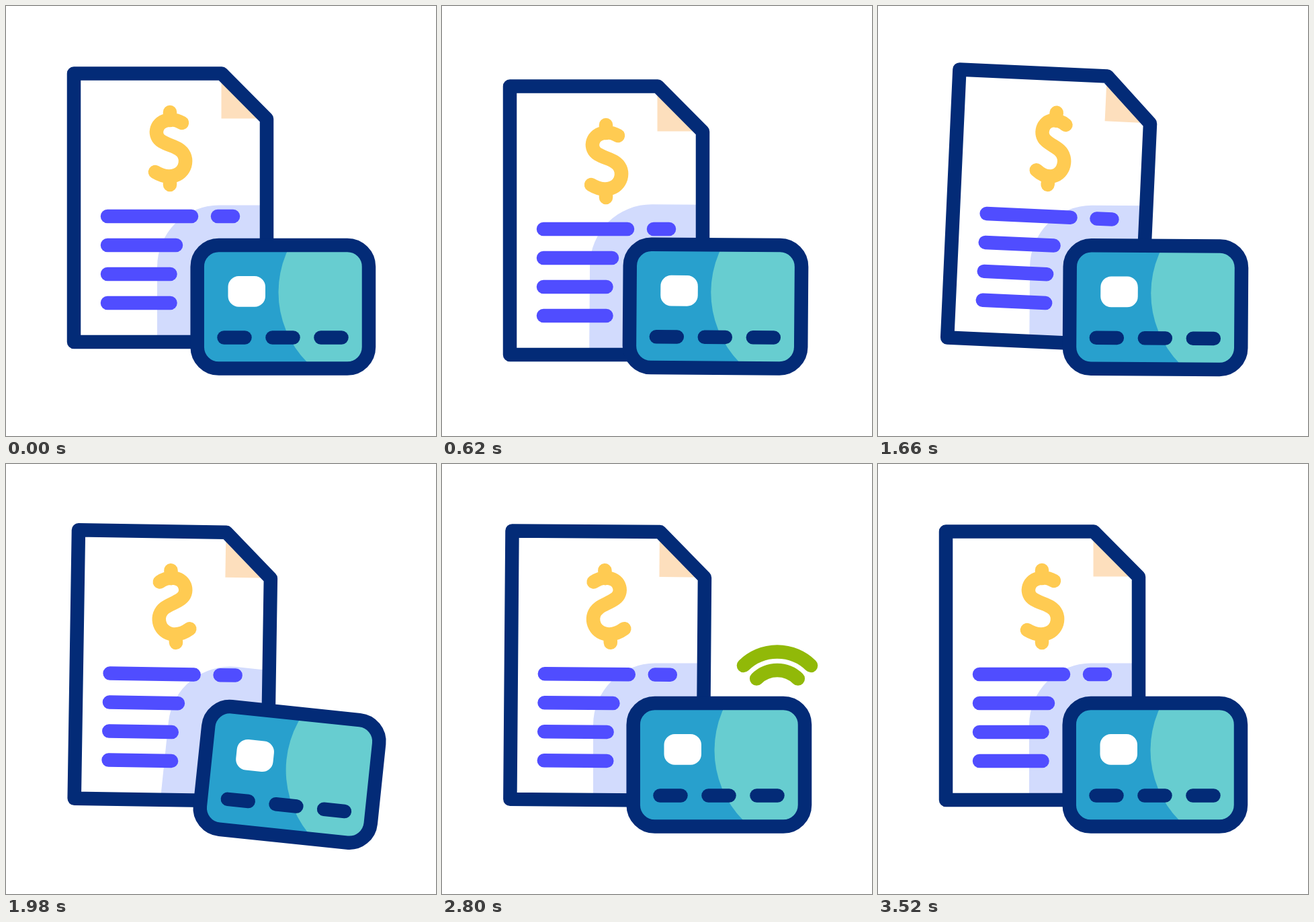
These frames come from a looping animation (640 px wide and 640 px high, 3600 ms). An HTML page with a canvas:

```html
<!DOCTYPE html>
<html lang="en">
<head>
<meta charset="utf-8">
<title>Invoice and card</title>
<style>
html, body { margin: 0; width: 100%; height: 100%; overflow: hidden; background: #fff; }
canvas { display: block; width: 100vmin; height: 100vmin; }
</style>
</head>
<body>
<canvas id="stage" width="640" height="640"></canvas>
<script>
const ctx = document.getElementById('stage').getContext('2d');
const LOOP = 3600;
const LINE = 20.5;
const NAVY = '#032b77', BLUE = '#28a0cd', TEAL = '#67cdd0', SHADE = '#d2dbfd';
const PEACH = '#fddfbd', GOLD = '#ffcb52', VIOLET = '#504dff', GREEN = '#91b908';

// Keys are [time, value] pairs, eased in and out between neighbours.
function track(keys, t) {
  if (t <= keys[0][0]) return keys[0][1];
  for (let i = 1; i < keys.length; i++) {
    const [t0, v0] = keys[i - 1], [t1, v1] = keys[i];
    if (t < t1) {
      const u = (t - t0) / (t1 - t0);
      return v0 + (v1 - v0) * u * u * (3 - 2 * u);
    }
  }
  return keys[keys.length - 1][1];
}

const docDrop = [[200, 0], [600, 19.2], [960, 0]];
const docTilt = [[1000, 0], [1400, -6], [1800, 6], [2200, -6], [2610, 6], [3010, -6], [3410, 0]];
const dollarFlip = [[1600, 1], [2000, -1], [2400, 1], [2800, -1], [3200, 1]];
const dollarTilt = [[1200, 0], [1600, 5], [3200, 5], [3520, 0]];
const cardSlide = [[0, 0], [240, 69.5], [960, -69.5], [1000, -69.5], [1400, 0]];
const cardRock = [[1600, 0], [2000, 6], [2400, -6], [2800, 0]];
const waves = [
  { radius: 44, keys: [[2100, 0], [2500, 1], [3240, 1], [3520, 0]] },
  { radius: 71.5, keys: [[2400, 0], [2800, 1], [3240, 1], [3520, 0]] },
  { radius: 99.5, keys: [[2800, 0], [3200, 1], [3240, 1], [3520, 0]] }
];

const sheet = new Path2D('M101 100.5H321L388 168V500H101Z');
const fold = new Path2D('M320.5 100V167.5H388Z');
const dollar = new Path2D(
  'M262 174C254 169.5 245 168.5 239 170.2C222 174 219 194 232 201.5' +
  'C240 206.5 250 208.5 257 213C273 223 269 246 252 252C242 255.5 231 252.5 222 247' +
  'M244 158V170M244 254V266');
const shade = new Path2D();
shade.roundRect(225, 296.5, 400, 320, 92);
const cardShape = new Path2D();
cardShape.roundRect(284.7, 356, 255.3, 183.5, 32);
const chip = new Path2D();
chip.roundRect(330.5, 402, 55.5, 45.7, 16);

function group(draw) {
  ctx.save();
  draw();
  ctx.restore();
}

function rotateAbout(x, y, degrees) {
  ctx.translate(x, y);
  ctx.rotate(degrees * Math.PI / 180);
  ctx.translate(-x, -y);
}

function scaleAbout(x, y, sx, sy) {
  ctx.translate(x, y);
  ctx.scale(sx, sy);
  ctx.translate(-x, -y);
}

function fill(path, color) {
  ctx.fillStyle = color;
  ctx.fill(path);
}

function stroke(path, color) {
  ctx.strokeStyle = color;
  ctx.stroke(path);
}

function bar(x0, x1, y, color) {
  const path = new Path2D();
  path.moveTo(x0, y);
  path.lineTo(x1, y);
  stroke(path, color);
}

function placeDoc(t) {
  ctx.translate(0, track(docDrop, t));
  rotateAbout(244.5, 544, track(docTilt, t));
}

// The card slides leaning on a rounded corner, then rocks on its left corner.
function placeCard(t) {
  const slide = track(cardSlide, t);
  ctx.translate(slide, 0);
  rotateAbout(slide > 0 ? 317 : 507.5, 507.5, -slide / 14);
  rotateAbout(276, 548, track(cardRock, t));
}

function drawDoc(t) {
  group(() => {
    placeDoc(t);
    fill(sheet, '#fff');
    fill(fold, PEACH);
  });
  group(() => {
    const frame = ctx.getTransform();
    placeDoc(t);
    ctx.clip(sheet);
    ctx.setTransform(frame);
    placeCard(t);
    fill(shade, SHADE);
  });
  group(() => {
    placeDoc(t);
    bar(151, 276, 313, VIOLET);
    bar(315, 338, 313, VIOLET);
    bar(151, 253, 356, VIOLET);
    bar(151, 244.5, 399, VIOLET);
    bar(151, 244.5, 442, VIOLET);
    stroke(sheet, NAVY);
    const flip = track(dollarFlip, t);
    scaleAbout(244, 212, flip, 1);
    rotateAbout(244, 212, track(dollarTilt, t));
    // The line keeps its weight while the sign turns.
    const turned = new Path2D();
    turned.addPath(dollar, ctx.getTransform());
    ctx.setTransform(1, 0, 0, 1, 0, 0);
    stroke(turned, GOLD);
  });
}

function drawWaves(t) {
  for (const { radius, keys } of waves) {
    const size = track(keys, t);
    if (size < 0.01) continue;
    group(() => {
      scaleAbout(499, 372, size, size);
      const path = new Path2D();
      path.arc(499, 351, radius, -Math.PI * 0.747, -Math.PI * 0.253);
      stroke(path, GREEN);
    });
  }
}

function drawCard(t) {
  group(() => {
    placeCard(t);
    drawWaves(t);
    fill(cardShape, BLUE);
    group(() => {
      ctx.clip(cardShape);
      const disc = new Path2D();
      disc.arc(554.5, 426, 149, 0, Math.PI * 2);
      fill(disc, TEAL);
    });
    fill(chip, '#fff');
    for (let x = 324.5; x < 500; x += 72) bar(x, x + 31, 493.5, NAVY);
    stroke(cardShape, NAVY);
  });
}

function render(t) {
  ctx.setTransform(1, 0, 0, 1, 0, 0);
  ctx.fillStyle = '#fff';
  ctx.fillRect(0, 0, 640, 640);
  ctx.lineWidth = LINE;
  ctx.lineCap = ctx.lineJoin = 'round';
  drawDoc(t);
  drawCard(t);
}

let start;
function tick(now) {
  if (start === undefined) start = now;
  render((now - start) % LOOP);
  requestAnimationFrame(tick);
}
render(0);
requestAnimationFrame(tick);
</script>
</body>
</html>
```
